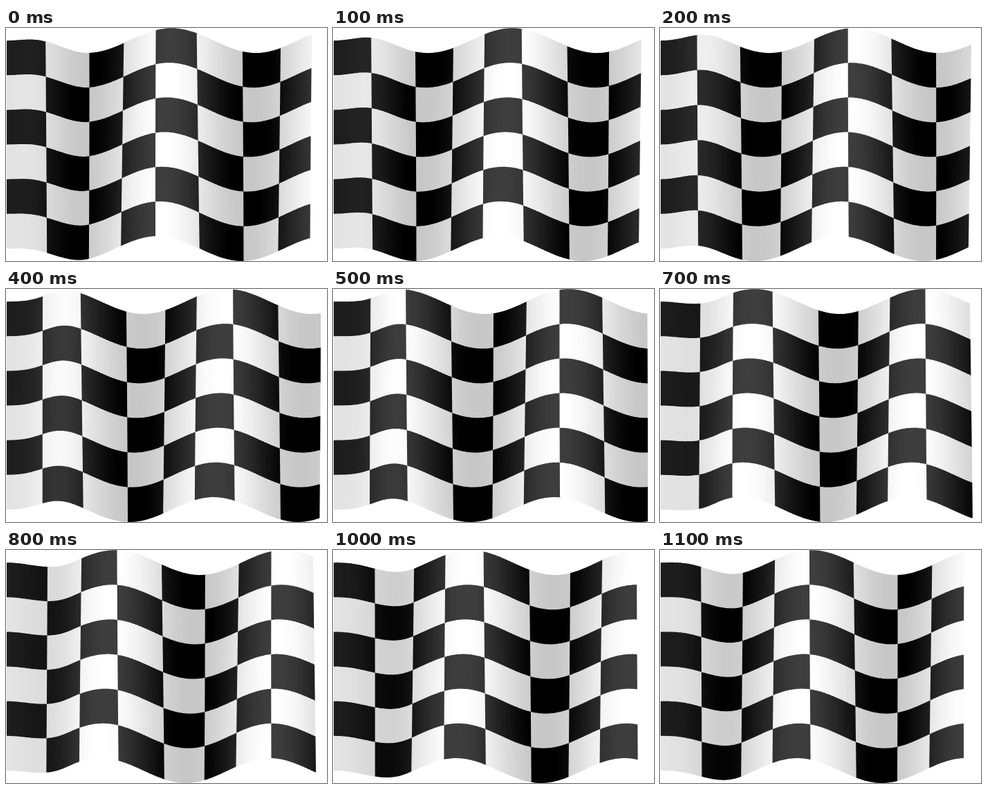
These frames come from a looping animation (464x337 px, 1200 ms). An HTML page with a canvas:

```html
<!DOCTYPE html>
<html lang="en">
<head>
<meta charset="utf-8">
<title>Chequered flag</title>
<style>
  html, body { margin: 0; width: 100%; height: 100%; overflow: hidden; background: #fff; }
  canvas { display: block; }
</style>
</head>
<body>
<canvas id="flag" width="464" height="337"></canvas>
<script>
const ctx = document.getElementById('flag').getContext('2d');

const COLS = 8, ROWS = 6, SLICES = 16;
const LEFT = 1, TOP = 18.2, CELL_W = 55.75, CELL_H = 50.13;
const STEPS = 12, STEP_MS = 100;
const SWAY = 8.05, LIFT = 18;
const TURN = 2 * Math.PI / STEPS;
const OVERLAP = 0.03;

// The cloth is pinned at the pole and swings freely after two columns.
function freedom(col) {
  const k = Math.min(1, col / 2);
  return k * k * (3 - 2 * k);
}

// Steps the wave needs to reach a point; it starts slowly at the pole,
// and lower rows trail the top edge by one step.
function delay(col, row) {
  return 6.08 + 2.765 * Math.hypot(col, 0.55) + row / ROWS;
}

function clothAt(col, row, step) {
  const angle = TURN * (step - delay(col, row));
  const sway = Math.cos(angle);
  const wave = Math.cos(angle - 0.2 * sway);
  const free = freedom(col);
  return {
    x: LEFT + CELL_W * col + SWAY * free * sway,
    y: TOP + CELL_H * row + LIFT * free * wave,
    depth: free * wave
  };
}

function shade(isDark, depth) {
  const level = isDark ? 29 - 33 * depth : 227 - 28 * depth;
  const v = Math.round(Math.max(0, Math.min(255, level)));
  return `rgb(${v},${v},${v})`;
}

function drawSlice(col, row, width, isDark, step) {
  // The overlap hides the joints; the next slice or row covers the excess.
  const right = Math.min(COLS, col + width + OVERLAP);
  const bottom = Math.min(ROWS, row + 1 + OVERLAP);
  const corners = [[col, row], [right, row], [right, bottom], [col, bottom]];
  ctx.fillStyle = shade(isDark, clothAt(col + width / 2, row + 0.5, step).depth);
  ctx.beginPath();
  for (const [c, r] of corners) {
    const p = clothAt(c, r, step);
    ctx.lineTo(p.x, p.y);
  }
  ctx.fill();
}

function draw(step) {
  ctx.fillStyle = '#fff';
  ctx.fillRect(0, 0, 464, 337);
  for (let row = 0; row < ROWS; row++) {
    for (let i = 0; i < COLS * SLICES; i++) {
      const isDark = (row + Math.floor(i / SLICES)) % 2 === 0;
      drawSlice(i / SLICES, row, 1 / SLICES, isDark, step);
    }
  }
}

const start = performance.now();
let shown = -1;

function tick() {
  const step = Math.floor((performance.now() - start) / STEP_MS) % STEPS;
  if (step !== shown) draw(shown = step);
  requestAnimationFrame(tick);
}
tick();
</script>
</body>
</html>
```
